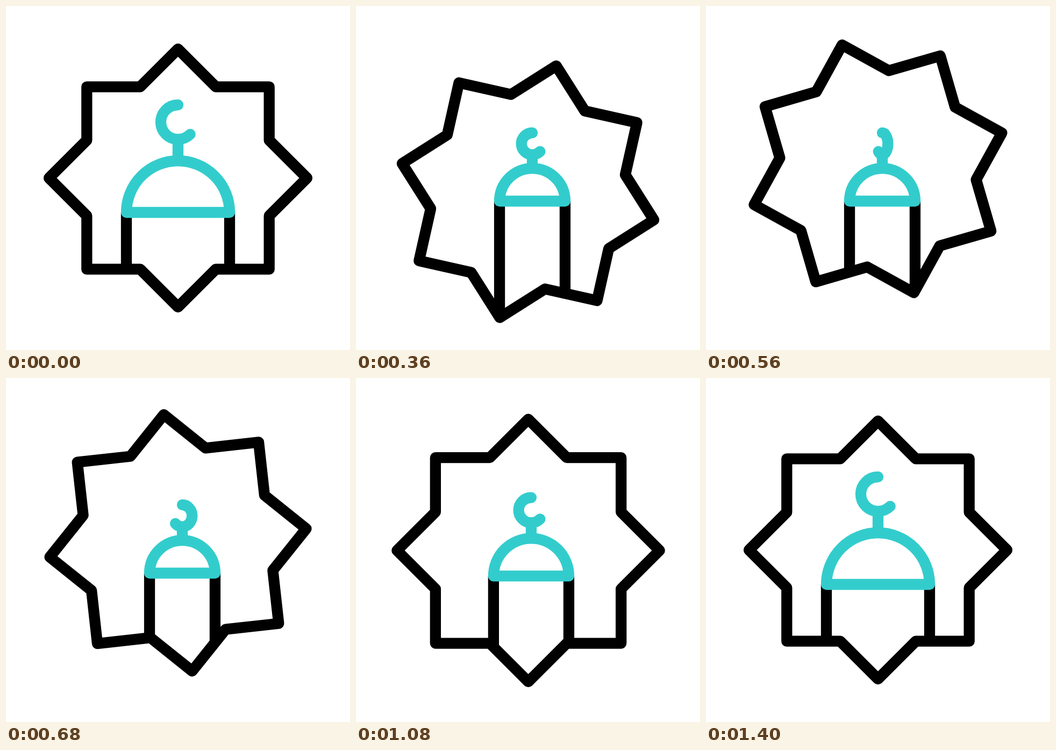
Recreate the animation shown at these times as an HTML page with a canvas. Size 640 by 640 pixels, loop 1480 ms.

```html
<!DOCTYPE html>
<html lang="en">
<head>
<meta charset="utf-8">
<title>Dome in a star</title>
<style>
  html, body { margin: 0; width: 100%; height: 100%; overflow: hidden; background: #fff; }
  canvas { display: block; width: 640px; height: 640px; }
</style>
</head>
<body>
<canvas id="stage" width="640" height="640"></canvas>
<script>
const ctx = document.getElementById('stage').getContext('2d');
const LOOP = 1480, STEP = 40, LINE = 20.3;
const BLACK = '#000', TEAL = '#33cccc';

// Cubic easing, level at both ends; a and b are the x positions of its handles.
function ease(x, a = 1 / 3, b = 2 / 3) {
  let low = 0, high = 1;
  for (let i = 0; i < 24; i++) {
    const m = (low + high) / 2, n = 1 - m;
    if (3 * n * n * m * a + 3 * n * m * m * b + m * m * m < x) low = m;
    else high = m;
  }
  return low * low * (3 - 2 * low);
}

// Keys are [time, value, in-handle].
function track(keys, t) {
  if (t <= keys[0][0]) return keys[0][1];
  for (let i = 1; i < keys.length; i++) {
    const [t0, v0] = keys[i - 1], [t1, v1, handle] = keys[i];
    if (t < t1) return v0 + (v1 - v0) * ease((t - t0) / (t1 - t0), 1 / 3, handle);
  }
  return keys[keys.length - 1][1];
}

const SOFT_END = 5 / 6;
const turn = [[80, 0], [800, Math.PI / 4, SOFT_END]];
const bob = [[80, 0], [360, 25.5], [600, -20.5], [800, 0]];
const pulse = [[1000, 0], [1200, 1], [1400, 0]];
const shrink = [[80, 0], [360, 1], [920, 1], [1400, 0]];
const flip = [[360, 1], [640, -1, 0.75], [920, 1, SOFT_END]];

function starPath(t) {
  const grow = track(pulse, t), angle = track(turn, t);
  const cx = 320 + 1.5 * grow, cy = 320 + 2.5 * grow + track(bob, t);
  const outer = 240 * (1 + 0.05 * grow);
  const inner = outer * Math.SQRT1_2 / Math.cos(Math.PI / 8);
  const path = new Path2D();
  for (let i = 0; i < 16; i++) {
    const a = angle + i * Math.PI / 8, r = i % 2 ? inner : outer;
    path.lineTo(cx + r * Math.sin(a), cy - r * Math.cos(a));
  }
  path.closePath();
  return path;
}

function stroke(path, color, cap = 'round') {
  ctx.strokeStyle = color;
  ctx.lineCap = cap;
  ctx.stroke(path);
}

function draw(t) {
  const star = starPath(t), p = track(shrink, t);
  const size = 1 - 0.365 * p, x = 320 + 8 * p, base = 384 - 21 * p;
  const radius = 96 * size;

  ctx.fillStyle = '#fff';
  ctx.fillRect(0, 0, 640, 640);
  ctx.lineWidth = LINE;
  ctx.lineJoin = 'round';

  // The walls reach down to wherever the star's edge is.
  const walls = new Path2D();
  for (const side of [-1, 1]) {
    walls.moveTo(x + side * radius, base);
    walls.lineTo(x + side * radius, 640);
  }
  ctx.save();
  ctx.clip(star);
  stroke(walls, BLACK, 'butt');
  ctx.restore();
  stroke(star, BLACK);

  const dome = new Path2D();
  dome.arc(x, base, radius, Math.PI, 0);
  dome.closePath();
  stroke(dome, TEAL);

  const stem = new Path2D();
  stem.moveTo(x, base - 136 * size);
  stem.lineTo(x, base - radius);
  stroke(stem, TEAL, 'butt');

  const arc = new Path2D(), crescent = new Path2D();
  arc.arc(0, -168, 32, -Math.PI / 2, Math.PI / 4, true);
  crescent.addPath(arc, new DOMMatrix([size * track(flip, t), 0, 0, size, x, base]));
  stroke(crescent, TEAL);
}

let start;
function tick(now) {
  start ??= now;
  const t = (now - start) % LOOP;
  draw(Math.floor(t / STEP) * STEP);
  requestAnimationFrame(tick);
}
draw(0);
requestAnimationFrame(tick);
</script>
</body>
</html>
```
